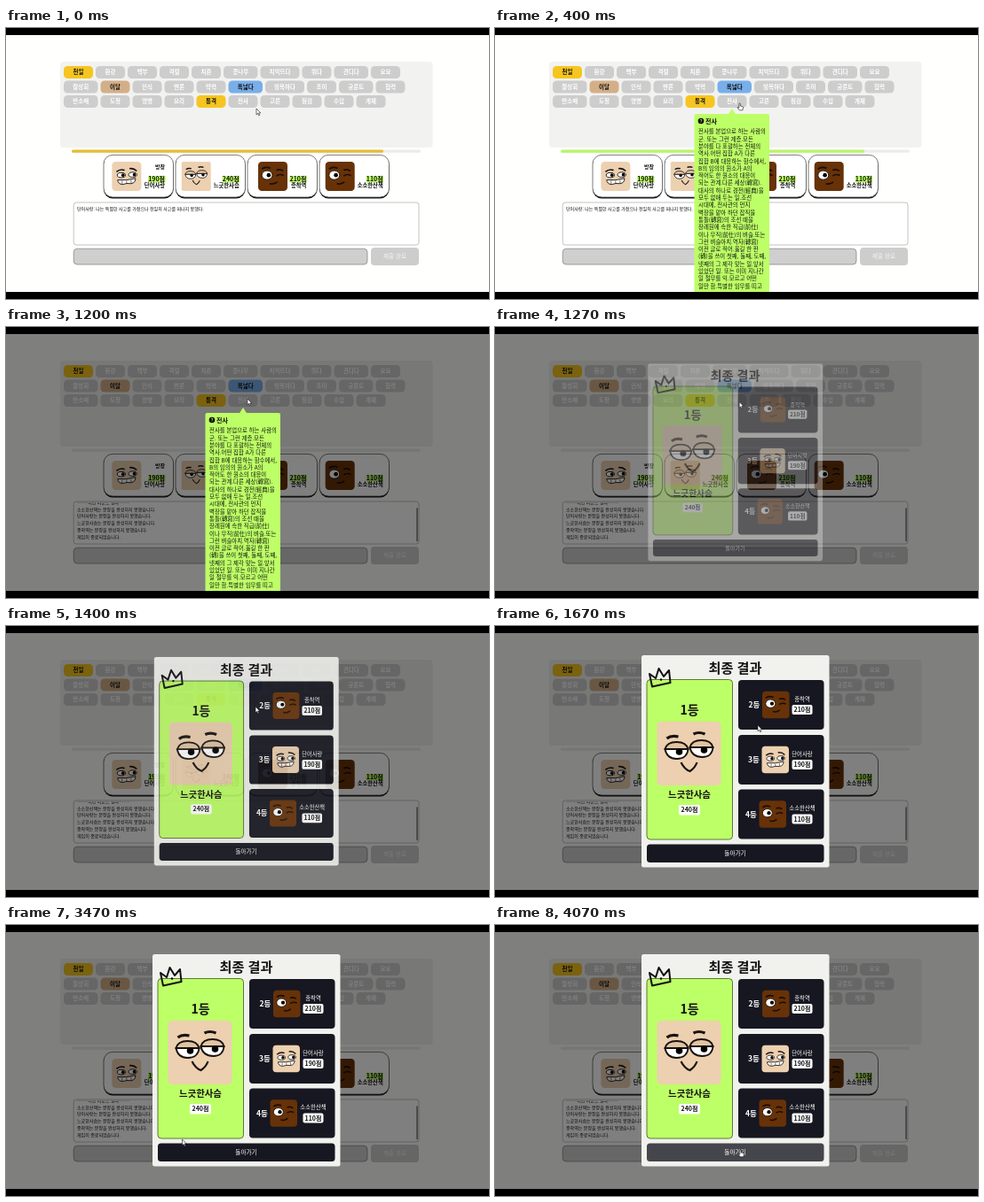
An HTML page that plays this animation: 544x306 px, repeating every 4.19 s.

```html
<!DOCTYPE html>
<html lang="ko">
<head>
<meta charset="utf-8">
<style>
  html, body { margin: 0; width: 100%; height: 100%; overflow: hidden; background: #000; }
  svg { display: block; width: 100vw; height: 100vh; }
  text { font-family: "Noto Sans CJK KR", "Noto Sans CJK", "Noto Sans", sans-serif; white-space: pre; }
</style>
</head>
<body>
<svg id="stage" viewBox="0 0 544 306">
  <defs>
    <clipPath id="screen"><rect y="8" width="544" height="290"/></clipPath>
    <clipPath id="logClip"><rect x="77" y="198.5" width="387" height="45.5"/></clipPath>
    <g id="grin">
      <rect width="72" height="72" rx="9" fill="#ecd0b0"/>
      <path d="M11 25 Q20 17 31 21 M43 17 Q53 15 61 23" fill="none" stroke="#181310" stroke-width="3.5"/>
      <g fill="#fff" stroke="#181310" stroke-width="2">
        <ellipse cx="23" cy="33" rx="10" ry="6"/><ellipse cx="51" cy="32" rx="10" ry="6"/>
        <path d="M14 45 Q36 47 58 41 Q58 52 47 54 Q36 52 26 56 Q15 55 14 45Z"/>
        <path d="M25 47 V55 M36 47 V53 M47 45 V53" fill="none" stroke-width="1.3"/>
      </g>
      <circle cx="27" cy="33" r="4"/><circle cx="55" cy="32" r="4"/>
    </g>
    <g id="sleepy">
      <rect width="72" height="72" rx="5" fill="#ecd0b0"/>
      <path d="M11 19 Q16 15 24 17 M41 14 Q47 11 54 14" fill="none" stroke="#181310" stroke-width="3.2"/>
      <g stroke="#181310" stroke-width="1.8">
        <path d="M9 31 H35 Q34 42 22 42 Q11 42 9 31Z M37 29 H63 Q62 40 51 40 Q39 40 37 29Z" fill="#fff"/>
        <path d="M9 31 Q11 23 22 23 Q33 23 35 31Z M37 29 Q39 21 50 21 Q61 21 63 29Z" fill="#e2c4a2"/>
        <path d="M27 46 Q31 54 37 56 Q43 52 45 46" fill="none" stroke-width="2.2"/>
      </g>
      <circle cx="25" cy="34" r="3.8"/><circle cx="53" cy="32" r="3.8"/>
    </g>
    <g id="wink">
      <rect width="72" height="72" rx="9" fill="#673208"/>
      <path d="M9 18 Q18 11 30 16 M45 21 Q54 17 61 23" fill="none" stroke="#1b0d05" stroke-width="4"/>
      <ellipse cx="22" cy="33" rx="13" ry="11" fill="#fff" stroke="#1b0d05" stroke-width="2"/>
      <circle cx="26" cy="33" r="5"/>
      <path d="M45 35 Q54 29 63 34 M28 54 Q38 57 47 50" fill="none" stroke="#1b0d05" stroke-width="3.5"/>
    </g>
  </defs>
  <g id="view" clip-path="url(#screen)"></g>
</svg>
<script>
const LIME = "#bdff66", YELLOW = "#f6c51f", GREY = "#cdcdcd", INK = "#171721";
const LOOP = 4190;

const rect = (x, y, w, h, fill, rx = 0, more = "") =>
  `<rect x="${x}" y="${y}" width="${w}" height="${h}" rx="${rx}" fill="${fill}" ${more}/>`;
// y is the vertical middle of the line
const text = (x, y, size, str, { fill = "#111", weight = 400, anchor = "middle" } = {}) =>
  `<text x="${x}" y="${y + size * 0.36}" font-size="${size}" font-weight="${weight}" fill="${fill}" text-anchor="${anchor}">${str}</text>`;
const face = (id, x, y, size) =>
  `<use href="#${id}" transform="translate(${x} ${y}) scale(${size / 72})"/>`;

const players = [
  { name: "단어사랑", score: "190점", face: "grin" },
  { name: "느긋한사슴", score: "240점", face: "sleepy" },
  { name: "종착역", score: "210점", face: "wink" },
  { name: "소소한산책", score: "110점", face: "wink" }
];

function chips() {
  const rows = [
    "천일 환강 백부 격렬 치죤 콩나무 치억뜨다 뛰다 견디다 요요",
    "찰상회 이달 인식 변론 박력 폭넓다 빙목하다 조이 궁룬트 협력",
    "반소매 도청 영병 요리 통격 전사 고른 점검 수입 개체"
  ];
  const marked = { 천일: YELLOW, 이달: "#d3af88", 폭넓다: "#78aeea", 통격: YELLOW };
  return rows.map((row, i) => {
    let x = 65;
    return row.split(" ").map(word => {
      const w = 22 + word.length * 5.5, y = 43 + i * 16.5, color = marked[word];
      const chip = rect(x, y, w, 14, color || GREY, 4.5) +
        text(x + w / 2, y + 7, 6.5, word, { fill: color ? "#111" : "#fff", weight: color ? 900 : 700 });
      x += w + 3;
      return chip;
    }).join("");
  }).join("");
}

// Face and text are centred together, so longer names push the face left
function card(p, i) {
  const x = 110 + i * 81, half = 19.25 + p.name.length * 2.65;
  const left = x + 39.2 - half, end = x + 39.2 + half;
  const right = { anchor: "end", weight: 900 };
  return rect(x, 144.5, 78.5, 48, "#111", 10) +
    rect(x, 143.4, 78.5, 47.6, "#fff", 10, 'stroke="#444" stroke-width=".7"') +
    face(p.face, left, 151, 33) +
    (i ? "" : text(end, 157, 6, "방장", right)) +
    rect(end - 19, 167, 19.5, 7.5, LIME) +
    text(end, 170.5, 7, p.score, right) +
    text(end, 177.5, 6.3, p.name, right);
}

function chatLog() {
  const fail = [3, 0, 1, 2].map(i => `${players[i].name}는 문장을 완성하지 못했습니다.`);
  const lines = ["-------이번 라운드 결과-------", ...fail, "게임이 종료되었습니다."];
  const line = (s, i) => text(80, 204 + i * 7.8, 5, s, { anchor: "start", weight: 500 });
  return `<g clip-path="url(#logClip)"><g id="log">` +
    line(`${players[0].name}: 나는 특별한 사고를 가졌으나 천일의 사고를 떠나지 못했다.`, 0) +
    `<g id="result">${lines.map((s, i) => line(s, i + 1)).join("")}</g></g></g>` +
    rect(462.3, 198, 1.5, 38, "#777", 0.7, 'id="thumb"');
}

function tooltip() {
  const lines = [
    "전사를 본업으로 하는 사람의", "군. 또는 그런 계층.모든", "분야를 다 포괄하는 전체의",
    "역사.어떤 집합 A가 다른", "집합 B에 대응하는 함수에서,", "B의 임의의 원소가 A의",
    "적어도 한 원소의 대응이", "되는 관계.다른 세상(轉寫).", "대사의 하나로 경전(經典)을",
    "모두 없애 두는 일.조선", "시대에, 전사관의 먼지", "벽장을 맡아 하던 잡직을",
    "통틀(轉寫)의 조선 때을", "장례원에 속한 직급(前仕)", "이나 무직(前仕)의 벼슬.또는",
    "그런 벼슬아치.역자(轉寫)", "이전 글로 적어.옮길 한 판", "(轉)을 쓰이 첫째, 둘째, 도째,",
    "넷째의 그 제각 맞는 일.앞서", "있었던 일. 또는 이미 지나간", "일 철무를 익.모르고 어떤",
    "일만 함.특별한 임무를 띠고"
  ];
  return `<g id="tip"><path d="M262.5 98 L267 91 L271.5 98Z" fill="${LIME}"/>` +
    rect(224.5, 97, 84.5, 220, LIME, 2) +
    `<circle cx="232" cy="105" r="3.3" fill="#111"/>` +
    text(232, 105, 5, "?", { fill: LIME, weight: 700 }) +
    text(237, 105, 7, "전사", { anchor: "start", weight: 700 }) +
    lines.map((s, i) => text(229, 117 + i * 8.3, 6.4, s, { anchor: "start" })).join("") + "</g>";
}

function runnerUp(rank, p, y, shift) {
  return rect(274, y, 96.5, 56, INK, 4) +
    text(292 - shift, y + 28, 8.5, rank + "등", { fill: "#fff", weight: 900 }) +
    face(p.face, 301 - shift, y + 12.7, 30.5) +
    text(346, y + 21.5, 6.4, p.name, { fill: "#fff" }) +
    rect(334.5, y + 28, 23, 11, "#fff", 2) +
    text(346, y + 33.5, 7, p.score, { weight: 900 });
}

function modal() {
  const [third, first, second, fourth] = players;
  return `<g id="modal">` + rect(165, 33, 211.5, 239.5, "#f1f1ee", 2.5) +
    text(270.5, 47.5, 15.2, "최종 결과", { weight: 900 }) +
    rect(171, 60.5, 96.5, 180.5, LIME, 4, 'stroke="#3c5a18" stroke-width=".8"') +
    `<path d="M174 54 L181 59 L184.5 48 L190 57 L196 50 L197.5 64 L177 68.5Z" fill="none" stroke="#111" stroke-width="2" stroke-linejoin="round"/>
     <circle cx="187" cy="60.5" r="1.2"/>` +
    text(219, 95, 14, "1등", { weight: 900 }) +
    face(first.face, 182.5, 108, 72) +
    text(219, 190.5, 10.4, first.name, { weight: 900 }) +
    rect(207, 202, 24, 11.5, "#fff", 2) +
    text(219, 207.7, 7, first.score, { weight: 900 }) +
    runnerUp(2, second, 61, 0) + runnerUp(3, third, 123, 0.5) + runnerUp(4, fourth, 184.5, 3.5) +
    rect(171, 246.5, 199.5, 20.5, INK, 3.5, 'id="back"') +
    text(270.5, 256.7, 6.6, "돌아가기", { fill: "#fff" }) + "</g>";
}

const cursors = `<g id="cursor" fill="#fff" stroke="#111" stroke-width=".6" stroke-linejoin="round">
  <path id="arrow" d="M0 0 V6.8 L1.6 5.4 L2.6 7.8 L3.7 7.3 L2.7 4.9 H4.7Z"/>
  <path id="hand" d="M-.6 .3 Q0 -.4 .7 .3 V3 L3.4 3.6 Q4.2 3.9 4 4.8 L3.4 7.8 H-.2 L-2.4 5 Q-2.4 4 -1.5 4.4 L-.6 5.2Z"/></g>`;

const $ = id => document.getElementById(id);
$("view").innerHTML =
  rect(0, 8, 544, 290, "#fffffd") +
  rect(61, 38, 419.5, 97, "#f2f2f0", 4) + chips() +
  rect(74, 137.4, 393, 3.4, "#ececea", 1.5) +
  rect(74, 137.4, 351, 3.4, YELLOW, 1.5, 'id="bar"') +
  players.map(card).join("") +
  rect(76.2, 197, 388.8, 48, "#fff", 3, 'stroke="#9a9a9a" stroke-width=".6"') + chatLog() +
  rect(76.2, 249.2, 330.8, 17.8, "#cfcfcf", 4, 'stroke="#6a6a6a" stroke-width=".6"') +
  rect(411, 248, 54, 20, GREY, 4) +
  text(438, 258, 6.6, "제출 완료", { fill: "#f4f4f4" }) +
  rect(0, 8, 544, 290, "#000", 0, 'id="shade" opacity=".5"') + tooltip() + modal() + cursors;

// Linear value at time t from [time, value] pairs
function at(keys, t) {
  const i = keys.findIndex(k => k[0] > t);
  if (i === 0) return keys[0][1];
  if (i < 0) return keys[keys.length - 1][1];
  const [t0, a] = keys[i - 1], [t1, b] = keys[i];
  return a + (b - a) * (t - t0) / (t1 - t0);
}

const path = [
  [0, 282, 91], [200, 279, 87], [600, 272, 83], [1070, 271, 82], [1200, 272, 81],
  [1400, 281, 91], [1670, 296, 112], [2000, 322, 150], [2470, 335.5, 170], [2600, 333, 176],
  [2870, 296, 212], [3200, 235, 236], [3470, 198.5, 242], [3600, 218, 248],
  [3800, 269, 254], [3990, 269, 254], [4070, 276.5, 254]
];
const pathX = path.map(p => [p[0], p[1]]), pathY = path.map(p => [p[0], p[2]]);
const show = (id, on) => $(id).setAttribute("visibility", on ? "visible" : "hidden");

function draw(t) {
  const over = t >= 1200, done = t >= 600;
  const hovering = t >= 200 && !over, onBack = t >= 3600;

  const bar = $("bar");
  bar.setAttribute("width", at([[70, 351], [200, 361], [1070, 279]], t));
  bar.setAttribute("fill", t < 200 ? "#e6bd35" : "#b9f56a");
  show("bar", !over);

  const scroll = at([[600, 0], [1070, 8], [1200, 13.8]], t);
  $("log").setAttribute("transform", `translate(0 ${-scroll})`);
  $("thumb").setAttribute("y", 198 + scroll * 0.45);
  show("result", done);
  show("thumb", done);

  show("tip", t >= 200 && t < 1270);
  show("shade", over);

  const zoom = at([[1200, 0.9], [1270, 0.93], [1400, 0.983], [1470, 0.994], [1600, 1]], t);
  $("modal").setAttribute("opacity", at([[1200, 0], [1270, 0.35], [1400, 0.87], [1470, 0.96], [1600, 1]], t));
  $("modal").setAttribute("transform", `translate(270.5 153) scale(${zoom}) translate(-270.5 -153)`);
  $("back").setAttribute("fill", onBack ? "#45454c" : INK);

  $("cursor").setAttribute("transform", `translate(${at(pathX, t)} ${at(pathY, t)})`);
  show("hand", hovering || onBack);
  show("arrow", !hovering && !onBack);
}

// The picture advances twice in every 200 ms
function tick(now) {
  const t = now % LOOP, part = t % 200;
  draw(t - part + (part >= 70 ? 70 : 0));
  requestAnimationFrame(tick);
}
draw(0);
requestAnimationFrame(tick);
</script>
</body>
</html>
```
